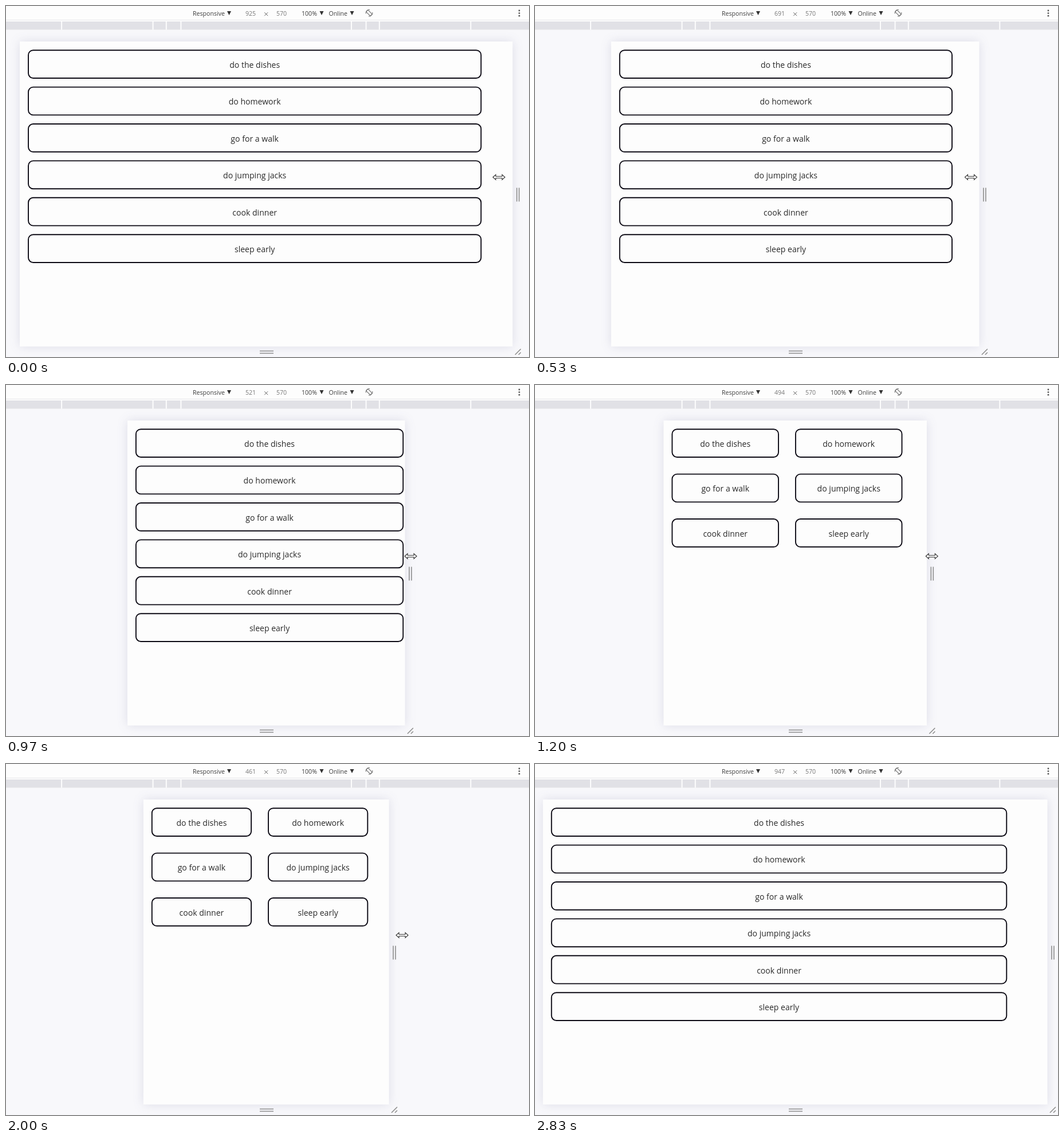
These frames come from a looping animation (913 px wide and 613 px high, 2.96 s). An HTML page:

```html
<!DOCTYPE html>
<html lang="en">
<head>
<meta charset="utf-8">
<title>Responsive list</title>
<style>
  html, body { margin: 0; width: 100%; height: 100%; overflow: hidden; background: #f8f8fb; }
  svg { display: block; width: 913px; height: 613px; font-family: "Open Sans", "Noto Sans", sans-serif; }
  #panel { fill: #fdfdfd; filter: drop-shadow(0 0 9px rgba(60, 60, 110, .14)); }
  #items rect { fill: none; stroke: #0c0a14; stroke-width: 1.9; }
  #items text { font-size: 14.06px; fill: #2a2a2a; text-anchor: middle; }
  #bar text { font-size: 10.6px; fill: #3c3c3c; }
  #bar .num { fill: #777; text-anchor: middle; }
  .grip { fill: none; stroke: #8e8e8e; stroke-width: 1.6; }
  .icon { fill: none; stroke: #666; stroke-width: 1; }
</style>
</head>
<body>
<svg viewBox="0 0 913 613">
  <rect width="913" height="613" fill="#f8f8fb"/>
  <rect id="panel" y="62" height="532.7"/>
  <g id="items"></g>
  <path class="grip" d="M443 602.5h24M443 606.5h24"/>
  <path id="grips" class="grip" d="M-2 317.5v24M2 317.5v24M-5 609l10-10M1 609l4-4"/>

  <g id="bar">
    <rect width="913" height="42" fill="#fdfdfd"/>
    <path d="M0 24.5h913" stroke="#e6e6ea"/>
    <rect y="27" width="913" height="14.5" fill="#e1e1e6"/>
    <path id="ticks" stroke="#fdfdfd" stroke-width="2"/>
    <text x="326" y="16.6">Responsive</text>
    <text id="width" class="num" x="427" y="16.6"></text>
    <text class="num" x="481" y="16.6">570</text>
    <text x="516" y="16.6">100%</text>
    <text x="563.5" y="16.6">Online</text>
    <path d="M386 9h7l-3.5 7zM547.5 9h7l-3.5 7zM600.5 9h7l-3.5 7z" fill="#333"/>
    <path d="M451.2 11.2l6 6m0-6l-6 6" class="icon"/>
    <g class="icon" transform="translate(634 12.2)">
      <rect x="-2.3" y="-5.2" width="4.6" height="10.4" rx="1" transform="rotate(-45)"/>
      <path d="M-5.7 1.2A5.8 5.8 0 0 1 1 -5.7M5.7 -1.2A5.8 5.8 0 0 1 -1 5.7"/>
    </g>
    <g fill="#555">
      <circle cx="896" cy="8" r="1.4"/><circle cx="896" cy="12.6" r="1.4"/><circle cx="896" cy="17.2" r="1.4"/>
    </g>
  </g>

  <path id="cursor" d="M-10.5 299l5-4.5v3h11v-3l5 4.5l-5 4.5v-3h-11v3z" fill="#fff" stroke="#333" stroke-width="1.1"/>
</svg>
<script>
const LOOP = 2960, SCALE = .93, CENTER = 454.2, BREAKPOINT = 500;
const $ = id => document.getElementById(id);

// Monotone cubic through [time, value] points
function curve(pts) {
  const d = pts.slice(1).map((p, i) => (p[1] - pts[i][1]) / (p[0] - pts[i][0]));
  const m = pts.map((p, i) => {
    if (i === 0) return d[0];
    if (i === d.length) return d[i - 1];
    const a = d[i - 1], b = d[i];
    return a * b <= 0 ? 0 : 2 * a * b / (a + b);
  });
  return t => {
    if (t >= pts[d.length][0]) return pts[d.length][1];
    let i = 0;
    while (t >= pts[i + 1][0]) i++;
    const h = pts[i + 1][0] - pts[i][0], u = (t - pts[i][0]) / h, v = 1 - u;
    return v * v * ((1 + 2 * u) * pts[i][1] + u * h * m[i])
         + u * u * ((3 - 2 * u) * pts[i + 1][1] - v * h * m[i + 1]);
  };
}

const widthAt = curve([[0, 925], [530, 691], [970, 521], [1400, 477], [1600, 461],
                       [2000, 461], [2400, 625], [2500, 686], [2830, 947]]);
const lagAt = curve([[0, 17], [530, 0], [970, 34], [1100, 0], [LOOP, 0]]);
const cursorAt = curve([[0, 860.5], [530, 761], [970, 706.5], [1400, 687.5], [1600, 690],
                        [1967, 690], [2000, 691.5], [2400, 853], [2500, 903], [2600, 940], [LOOP, 940]]);

const svgEl = (name, attrs, parent) => {
  const el = document.createElementNS("http://www.w3.org/2000/svg", name);
  set(el, attrs);
  return parent.appendChild(el);
};
function set(el, attrs) {
  for (const k in attrs) el.setAttribute(k, attrs[k]);
}

const items = ["do the dishes", "do homework", "go for a walk", "do jumping jacks", "cook dinner", "sleep early"]
  .map(label => {
    const box = svgEl("rect", { height: 48.8, rx: 8.5 }, $("items"));
    const text = svgEl("text", {}, $("items"));
    text.textContent = label;
    return { box, text };
  });

$("ticks").setAttribute("d", [320, 375, 425, 768].map(w => {
  const half = w * SCALE / 2;
  return `M${CENTER - half} 27v14.5M${CENTER + half} 27v14.5`;
}).join(""));

function layout(left, w) {
  const cols = w > BREAKPOINT ? 1 : 2;
  const boxW = ((cols === 1 ? .9 : .4) * w + 4) * SCALE;
  const pitch = cols === 1 ? 64.4 : 78.4;
  items.forEach(({ box, text }, i) => {
    const x = left + 14 + (i % cols) * (boxW + 28);
    const y = 77.2 + Math.floor(i / cols) * pitch;
    set(box, { x: x + .95, y, width: boxW - 1.9 });
    set(text, { x: x + boxW / 2, y: y + 30.8 });
  });
}

function render(now) {
  // 30 steps a second, with step times rounded to 10 ms
  const t = Math.floor(now % LOOP / 10) * 10;
  const step = Math.min(85, Math.floor((t + 3.4) * .03)) * 100 / 3;
  const time = Math.round(step / 10) * 10;
  const w = Math.round(widthAt(time));
  const half = w * SCALE / 2;
  set($("panel"), { x: CENTER - half, width: 2 * half });
  $("width").textContent = w;
  set($("grips"), { transform: `translate(${CENTER + half + 9.4} 0)` });
  set($("cursor"), { transform: `translate(${cursorAt(time)} 0)` });
  layout(CENTER - half, w + lagAt(time));
}

const start = performance.now();
function tick() {
  render(performance.now() - start);
  requestAnimationFrame(tick);
}
tick();
</script>
</body>
</html>
```
